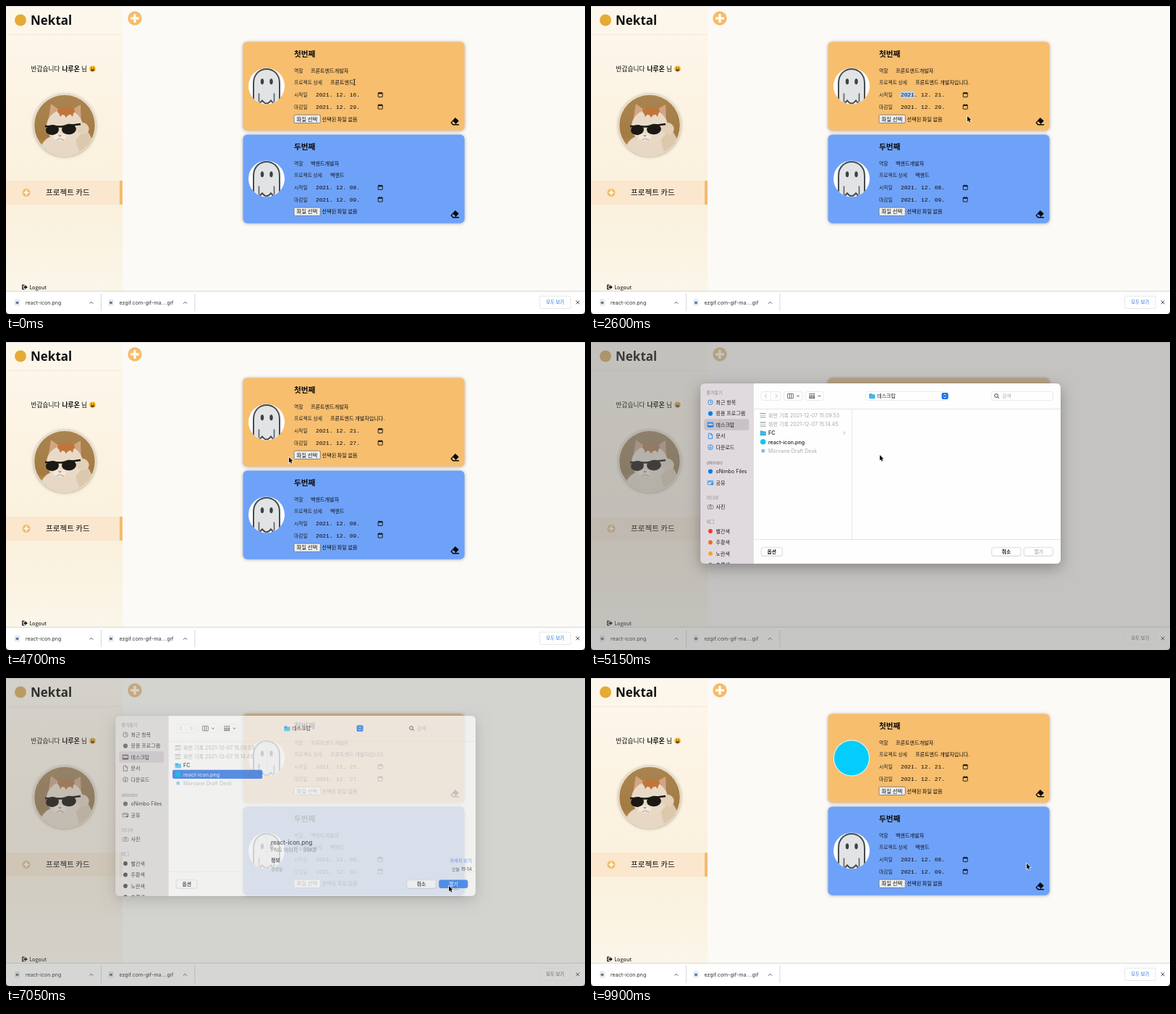
These frames come from a looping animation (800 px wide and 425 px high, 9.95 s). An HTML page with a canvas:

```html
<!DOCTYPE html>
<html lang="ko">
<head>
<meta charset="utf-8">
<title>프로젝트 카드</title>
<style>
html, body { margin: 0; width: 100%; height: 100%; overflow: hidden; }
canvas { display: block; width: 800px; height: 425px; }
</style>
</head>
<body>
<canvas id="stage"></canvas>
<script>
const LOOP = 9950, STEP = 50, W = 800, H = 425;
const KR = '"Noto Sans CJK KR", "Noto Sans CJK", sans-serif';
const UI = 'Inter, "Noto Sans CJK KR", "Noto Sans CJK", sans-serif';
const BRAND = '"Noto Sans", sans-serif';
const MONO = '"Liberation Mono", monospace';
const canvas = document.getElementById('stage');
const c = canvas.getContext('2d');
const ratio = window.devicePixelRatio || 1;
canvas.width = W * ratio;
canvas.height = H * ratio;

const ORANGE = '#f7be6e', BLUE = '#6ea2f8', INK = '#0c0c0c', ACCENT = '#0a7fe8';
const clamp = v => Math.max(0, Math.min(1, v));
const ramp = (t, a, b) => clamp((t - a) / (b - a));
const ease = u => u * u * (3 - 2 * u);

function text(s, x, y, size, color = INK, weight = 400, font = KR, align = 'left') {
  c.font = `${weight} ${size}px ${font}`;
  c.textAlign = align;
  c.fillStyle = color;
  c.fillText(s, x, y);
}
function rect(x, y, w, h, color) {
  c.fillStyle = color;
  c.fillRect(x, y, w, h);
}
function box(x, y, w, h, r, fill, stroke, line = 0.7) {
  c.beginPath();
  c.roundRect(x, y, w, h, r);
  if (fill) { c.fillStyle = fill; c.fill(); }
  if (stroke) { c.strokeStyle = stroke; c.lineWidth = line; c.stroke(); }
}
function oval(x, y, rx, ry, color, turn = 0) {
  c.beginPath();
  c.ellipse(x, y, rx, ry, turn, 0, 7);
  c.fillStyle = color;
  c.fill();
}
const dot = (x, y, r, color) => oval(x, y, r, r, color);
function ring(x, y, r, color, line = 0.8) {
  c.beginPath();
  c.arc(x, y, r, 0, 7);
  c.strokeStyle = color;
  c.lineWidth = line;
  c.stroke();
}
// Points are given as a flat list x, y, x, y …
function path(points) {
  c.beginPath();
  for (let i = 0; i < points.length; i += 2) c.lineTo(points[i], points[i + 1]);
}
function poly(points, color) {
  path(points);
  c.fillStyle = color;
  c.fill();
}
function lines(points, color, width = 0.8) {
  path(points);
  c.strokeStyle = color;
  c.lineWidth = width;
  c.stroke();
}
function shadow(color, blur, dy = 0) {
  c.shadowColor = color;
  c.shadowBlur = blur * ratio;
  c.shadowOffsetY = dy * ratio;
}
const noShadow = () => shadow('transparent', 0);

function plus(x, y, r) {
  dot(x, y, r, '#f6bb68');
  const a = r * 0.62, b = r * 0.17;
  rect(x - a, y - b, 2 * a, 2 * b, '#fffaf0');
  rect(x - b, y - a, 2 * b, 2 * a, '#fffaf0');
}

function catPhoto() {
  c.save();
  shadow('rgba(0,0,0,.35)', 4, 0.5);
  dot(81, 164.5, 43, '#f4e6cb');
  noShadow();
  c.beginPath();
  c.arc(81, 164.5, 41.8, 0, 7);
  c.clip();
  const wall = c.createLinearGradient(0, 122, 0, 207);
  wall.addColorStop(0, '#aa8551');
  wall.addColorStop(0.7, '#a37b43');
  wall.addColorStop(1, '#d8a24d');
  c.fillStyle = wall;
  c.fillRect(38, 121, 86, 87);
  oval(78, 201, 31, 25, '#e6d8c4');
  oval(109, 190, 11, 22, '#dcc8ad', -0.25);
  poly([58, 160, 62, 135, 76, 145], '#d3a582');
  poly([88, 145, 103, 136, 104, 161], '#d3a582');
  oval(81, 166, 25, 23, '#e9dac7');
  oval(83, 145, 12, 5.5, '#c1753d');
  poly([72, 145, 75, 153, 79, 148, 83, 154, 88, 148, 92, 153, 94, 145], '#c1753d');
  oval(106, 169, 9, 8, '#e3d0b8', 0.5);
  oval(64, 171, 9, 7, '#1b1815', -0.1);
  oval(87, 170, 10, 7.3, '#1b1815', -0.1);
  lines([54, 166, 76, 166.5, 103, 163], '#1b1815', 2.6);
  oval(74, 181, 9, 5, '#f1e7da');
  poly([72, 178, 77, 178, 74.5, 181], '#c28b78');
  lines([70, 185, 74.5, 183, 80, 185], '#a08874', 0.8);
  c.restore();
}

function smiley(x, y) {
  dot(x, y, 4.4, '#f8bd31');
  oval(x - 1.5, y - 1.3, 0.6, 1, '#5e3a10');
  oval(x + 1.5, y - 1.3, 0.6, 1, '#5e3a10');
  c.beginPath();
  c.arc(x, y + 0.5, 2.7, 0, Math.PI);
  c.fillStyle = '#6b3515';
  c.fill();
}

function sidebar() {
  const g = c.createLinearGradient(0, 0, 0, 393);
  g.addColorStop(0, '#fdf7ec');
  g.addColorStop(0.35, '#fcf3e3');
  g.addColorStop(0.7, '#faf0dc');
  g.addColorStop(1, '#fbf6e9');
  c.fillStyle = g;
  c.fillRect(0, 0, 161, 393);
  rect(0, 39, 161, 0.8, '#f2e8d8');
  dot(20, 19.5, 8, '#e5ab35');
  text('Nektal', 34, 25.7, 17, '#111', 600, BRAND);
  text('반갑습니다', 34.5, 90, 8.7);
  text('나루온', 77.5, 90, 8.8, INK, 700);
  text('님', 104, 90, 8.7);
  smiley(119.6, 86.7);
  catPhoto();
  rect(0, 241, 161, 33, '#fae7ce');
  rect(157, 241, 4, 33, '#f4bc6b');
  plus(28, 257.5, 5.5);
  text('프로젝트 카드', 55, 261.3, 10.6);
  lines([25.5, 385.2, 22.7, 385.2, 22.7, 390.6, 25.5, 390.6], '#111', 1.2);
  rect(24.3, 386.9, 2.5, 2, '#111');
  poly([26.5, 384.9, 29.8, 387.9, 26.5, 390.9], '#111');
  text('Logout', 32.2, 390.7, 7.3, '#111', 500);
}

function ghost(x, y) {
  dot(x, y, 25, '#fff');
  c.save();
  c.beginPath();
  c.arc(x, y, 25, 0, 7);
  c.clip();
  c.beginPath();
  c.moveTo(x - 18, y + 21);
  c.lineTo(x - 18, y - 4);
  c.bezierCurveTo(x - 18, y - 30, x + 18, y - 30, x + 18, y - 4);
  c.lineTo(x + 18, y + 21);
  for (const k of [12, 0, -12]) c.quadraticCurveTo(x + k, y + 28, x + k - 6, y + 20);
  c.closePath();
  c.fillStyle = '#e1e3e5';
  c.fill();
  c.strokeStyle = '#464b50';
  c.lineWidth = 2;
  c.stroke();
  lines([x - 10.5, y + 10, x - 10.5, y + 22], '#5a5f64', 1.6);
  lines([x + 10.5, y + 10, x + 10.5, y + 22], '#5a5f64', 1.6);
  c.restore();
  oval(x - 6, y - 6.2, 2.2, 4, '#3c4146');
  oval(x + 6.5, y - 6.2, 2.2, 4, '#3c4146');
}

function calendarIcon(x, y) {
  box(x, y, 6, 5.8, 0.5, null, '#111', 0.9);
  rect(x, y, 6, 1.5, '#111');
  rect(x + 1, y - 1, 0.9, 1.2, '#111');
  rect(x + 4.1, y - 1, 0.9, 1.2, '#111');
}

function eraser(x, y, paper) {
  poly([x + 6.4, y, x + 11.4, y + 4.4, x + 7, y + 9, x + 11.6, y + 9, x + 11.6, y + 10.4,
    x + 3, y + 10.4, x, y + 7], '#080808');
  poly([x + 3.4, y + 4.9, x + 6.9, y + 8.1, x + 5.8, y + 9, x + 3.6, y + 9, x + 1.8, y + 7], paper);
}

function dateRow(label, day, y, focused) {
  text(label, 398, y, 6.8, '#222');
  if (focused) rect(427.7, y - 7.6, 19, 9.8, '#b3d4fc');
  text(`2021. 12. ${day}.`, 428, y, 7.8, INK, 400, MONO);
  calendarIcon(514.2, y - 5.3);
}

function card(y, d) {
  c.save();
  shadow('rgba(0,0,0,.32)', 4, 0.6);
  box(327.5, y, 306, 122.3, 6, d.color);
  c.restore();
  if (d.uploaded) {
    dot(360, y + 61, 25, '#e9fbff');
    dot(360, y + 61, 24, '#05cdfb');
  } else ghost(360, y + 61);
  text(d.title, 398, y + 20.8, 10.6, INK, 700);
  text('역할', 398, y + 42.7, 6.8, '#222');
  text(d.role, 421, y + 42.7, 7.1, INK, 500);
  text('프로젝트 상세', 398, y + 58.8, 6.8, '#222');
  text(d.detail, 448, y + 58.8, 7.1, INK, 500);
  if (d.caret) rect(448.4 + c.measureText(d.detail).width, y + 52, 0.6, 8, '#111');
  dateRow('시작일', d.start, y + 75.6, d.focus === 1);
  dateRow('마감일', d.end, y + 92.2, d.focus === 2);
  box(398, y + 100.7, 36.3, 11.3, 1.5, '#efefef', '#6d6d6d', 0.8);
  text('파일 선택', 401.5, y + 109, 7.4);
  text(d.file, 436.6, y + 109, 7.1, INK, 500);
  eraser(614.3, y + 104.6, d.color);
}

function pageIcon(x, y) {
  box(x - 2.6, y - 3.8, 5.4, 7.4, 0.4, '#fff', '#b8bdc4', 0.6);
  rect(x - 1.8, y - 1.6, 3.6, 3.4, '#54789f');
}
const caretUp = (x, y) => lines([x - 2.4, y + 1.2, x, y - 1.2, x + 2.4, y + 1.2], '#555', 1);

function downloads(inactive) {
  rect(0, 393, W, 32, '#fff');
  rect(0, 393, W, 0.8, '#cfcfcf');
  pageIcon(15.5, 409.3);
  text('react-icon.png', 27, 411.8, 7.1, '#333', 400, UI);
  caretUp(118, 409.5);
  rect(131, 397, 0.8, 24, '#cfcfcf');
  pageIcon(145, 409.3);
  text('ezgif.com-gif-ma....gif', 156.5, 411.8, 7.1, '#333', 400, UI);
  caretUp(247.5, 409.5);
  rect(260.5, 397, 0.8, 24, '#cfcfcf');
  box(737.5, 400.3, 42.5, 17.2, 2, '#fff', inactive ? '#f1f1f1' : '#dadce0');
  text('모두 보기', 758.7, 411.2, 6.4, inactive ? '#555' : '#1b6ce0', 500, KR, 'center');
  lines([787.5, 406.5, 792.3, 411.3], '#444', 1);
  lines([792.3, 406.5, 787.5, 411.3], '#444', 1);
}

function corners() {
  c.fillStyle = '#1c3567';
  for (const [x, s] of [[0, 1], [W, -1]]) {
    c.beginPath();
    c.moveTo(x, H);
    c.lineTo(x, H - 5);
    c.quadraticCurveTo(x, H, x + 5 * s, H);
    c.fill();
  }
}

const KEYS = '| | ㄱ| 개| 갭| 개바| 개발| 개발ㅈ| 개발자| 개발장| 개발자이| 개발자입| 개발자입ㄴ| 개발자입니| 개발자입닏| 개발자입니다| 개발자입니다.'.split('|');

function page(t) {
  rect(0, 0, W, H, '#fcfaf6');
  sidebar();
  rect(0, 0, W, 0.8, '#d9d8d6');
  plus(178, 17, 9.7);
  const key = Math.floor(ramp(t, 150, 1150) * (KEYS.length - 1));
  const none = '선택된 파일 없음';
  card(49.5, {
    color: ORANGE, title: '첫번째', role: '프론트엔드개발자', detail: '프론트엔드' + KEYS[key],
    caret: t < 1500, start: t < 2300 ? 16 : 21, end: t < 3800 ? 29 : 27,
    focus: t >= 1600 && t < 2900 ? 1 : t >= 2900 && t < 4150 ? 2 : 0,
    file: t >= 7150 && t < 9900 ? 'react-icon.png' : none, uploaded: t >= 9900
  });
  card(177.4, {
    color: BLUE, title: '두번째', role: '백엔드개발자', detail: '백엔드',
    start: '08', end: '09', focus: 0, file: none
  });
  downloads(t >= 5050 && t < 7150);
}

// A window behind a dialog turns paler and greyer.
function dimPage(amount) {
  c.save();
  c.globalCompositeOperation = 'saturation';
  rect(0, 0, W, H, `rgba(128,128,128,${0.4 * amount})`);
  c.restore();
  rect(0, 0, W, H, `rgba(118,117,115,${0.41 * amount})`);
}

function folder(x, y) {
  box(x - 4, y - 3.2, 4, 3, 0.6, '#2ba0dc');
  box(x - 4, y - 2.3, 8.2, 6, 0.7, '#41b5ec');
}

// Small outline icons of the file dialog's sidebar.
const ICONS = {
  clock(x, y, k) { ring(x, y, 3.3, k); lines([x, y - 2, x, y, x + 1.6, y + 0.6], k); },
  round(x, y, k) { dot(x, y, 3.1, k); },
  desk(x, y, k) { box(x - 3.8, y - 3, 7.6, 6, 0.6, null, k, 0.9); rect(x - 3.8, y + 1, 7.6, 2, k); rect(x - 3.8, y - 3, 7.6, 1.2, k); },
  doc(x, y, k) { lines([x + 0.6, y - 3.6, x - 2.6, y - 3.6, x - 2.6, y + 3.6, x + 2.6, y + 3.6, x + 2.6, y - 1.5, x + 0.6, y - 3.6, x + 0.6, y - 1.5, x + 2.6, y - 1.5], k); },
  down(x, y, k) { ring(x, y, 3.4, k); lines([x, y - 1.9, x, y + 1.7], k); lines([x - 1.5, y + 0.3, x, y + 1.8, x + 1.5, y + 0.3], k); },
  share(x, y, k) { box(x - 3.8, y - 2.4, 7.6, 5.2, 0.7, null, k); lines([x - 3.8, y - 0.9, x + 3.8, y - 0.9], k); dot(x + 2.3, y + 1.8, 1.4, k); },
  camera(x, y) { box(x - 3.9, y - 2.2, 7.8, 5.2, 0.8, null, '#777'); ring(x, y + 0.4, 1.5, '#777'); rect(x - 1.3, y - 3.2, 2.6, 1, '#777'); }
};

const PLACES = [
  ['즐겨찾기', 72.3], ['최근 항목', 85.8, 'clock'], ['응용 프로그램', 101.3, 'round'],
  ['데스크탑', 116.8, 'desk'], ['문서', 132.3, 'doc'], ['다운로드', 147.8, 'down'],
  ['oNimbo', 168.5], ['oNimbo Files', 181.2, 'round'], ['공유', 196.6, 'share'],
  ['미디어', 216.8], ['사진', 230, 'camera'], ['태그', 250.3],
  ['빨간색', 263.6, '#f5372e'], ['주황색', 279.1, '#e8701c'],
  ['노란색', 294.6, '#f7a51c'], ['초록색', 310.1, '#37b44a']
];

function places(inactive) {
  rect(151, 57, 73.5, 249, inactive ? '#dfdcdc' : '#e0dadf');
  box(156.3, 106.3, 62, 15.4, 3, '#c8c2c7');
  for (const [name, y, icon] of PLACES) {
    if (!icon) text(name, 159.5, y, 6, '#8c878b', 500, UI);
    else {
      text(name, 172.5, y, 7, '#1f1f1f', 400, UI);
      if (icon[0] === '#') dot(165, y - 2.6, 2.9, inactive ? '#333' : icon);
      else ICONS[icon](165, y - 2.6, inactive ? '#555' : ACCENT);
    }
  }
}

function button(label, x, w, blue, color = '#1c1c1c') {
  c.save();
  shadow('rgba(0,0,0,.2)', 1, 0.4);
  box(x, 283.4, w, 11.5, 2.8, blue ? '#2777ef' : '#fff', blue ? null : '#dedede', 0.5);
  c.restore();
  text(label, x + w / 2, 291.7, 6.8, blue ? '#fff' : color, 600, UI, 'center');
}

function toolbar() {
  const edge = '#e2e2e2', gray = '#b5b5b5', dark = '#444';
  box(235, 68.5, 27, 12, 3, null, edge);
  rect(248.4, 68.5, 0.6, 12, edge);
  lines([243, 71.8, 240.3, 74.5, 243, 77.2], gray, 1);
  lines([254.5, 71.8, 257.2, 74.5, 254.5, 77.2], gray, 1);
  box(266.5, 68.5, 25.5, 12, 3, null, edge);
  box(271.5, 71.3, 8, 6.5, 0.7, null, dark);
  for (const x of [274.2, 276.9]) lines([x, 71.3, x, 77.8], dark);
  box(296, 68.5, 25.5, 12, 3, null, edge);
  for (let i = 0; i < 9; i++) rect(301.5 + (i % 3) * 2.8, 71 + Math.floor(i / 3) * 2.6, 2, i < 3 ? 1.2 : 1.9, dark);
  for (const x of [286, 315.5]) lines([x - 1.7, 73.7, x, 75.4, x + 1.7, 73.7], dark, 1);
  box(379.5, 68.3, 115, 12.2, 3, null, edge);
  folder(388.3, 74.5);
  text('데스크탑', 395.2, 77, 7, '#222', 500, UI);
  box(484.5, 70, 9, 9, 2.2, '#1671ea');
  lines([487.3, 73.6, 489, 71.9, 490.7, 73.6], '#fff', 1);
  lines([487.3, 75.5, 489, 77.2, 490.7, 75.5], '#fff', 1);
  box(553, 68.3, 85.5, 12.2, 3, null, edge);
  ring(560, 74, 2.4, dark, 1);
  lines([561.7, 75.7, 563.8, 77.8], dark, 1);
  text('검색', 568, 77, 6.8, '#aaa', 400, UI);
}

function fileList(selected) {
  const names = ['화면 기록 2021-12-07 15.09.53', '화면 기록 2021-12-07 15.14.45', 'FC', 'react-icon.png', 'Morvane Draft Desk'];
  if (selected) box(230, 131.7, 124.3, 12.2, 2.5, '#1c66dc');
  names.forEach((name, i) => {
    const y = 103.6 + i * 12.3, live = i === 2 || i === 3;
    const color = i === 3 && selected ? '#fff' : live ? '#1b1b1b' : '#aaa';
    if (i < 2) {
      rect(233.5, y - 5.5, 8, 1.2, '#999');
      rect(233.5, y - 2.6, 8, 1.1, '#c8c8c8');
      rect(233.5, y - 0.2, 8, 1.1, '#aaa');
    } else if (i === 2) folder(237.7, y - 2.6);
    else if (i === 3) dot(237.7, y - 2.7, 3.8, '#11c7ee');
    else rect(235.5, y - 4.8, 4.4, 4.4, '#7ebbe6');
    text(name, 245, y, 7.1, color, live ? 500 : 400, UI);
  });
  lines([348.8, 123.6, 350.8, 125.6, 348.8, 127.6], '#999');
}

function preview() {
  text('react-icon.png', 366, 234.6, 8.1, '#222', 500, UI);
  text('PNG 이미지 - 99KB', 366, 245.4, 7.2, '#777', 400, UI);
  text('정보', 366, 258.8, 6.8, '#222', 700, UI);
  text('자세히 보기', 643.5, 258.8, 6.2, '#2f73dd', 400, UI, 'right');
  text('생성일', 366, 271, 5.9, '#888', 400, UI);
  text('오늘 15:14', 643.5, 271, 6.2, '#333', 500, UI, 'right');
}

function dialog(t) {
  const shown = ramp(t, 5050, 5130), gone = ramp(t, 7010, 7150);
  const alpha = shown * (1 - gone);
  if (!alpha) return;
  const selected = t >= 6000;
  c.save();
  c.globalAlpha = alpha;
  c.translate(0, -5 * (1 - shown) - 5 * Math.min(1, gone * 3.5));
  c.save();
  // Shadow stays outside the sheet so that a fading sheet shows the cards beneath.
  c.beginPath();
  c.rect(0, -20, W, H + 40);
  c.roundRect(151, 57, 498, 249, 6);
  c.clip('evenodd');
  shadow(`rgba(0,0,0,${0.3 * alpha})`, 20, 6);
  box(151, 57, 498, 249, 6, '#fff');
  c.restore();
  c.save();
  c.beginPath();
  c.roundRect(151, 57, 498, 249, 6);
  c.clip();
  rect(224.5, 57, 425, 249, '#fefefe');
  places(t >= 7000);
  toolbar();
  rect(224.5, 92, 424.5, 0.8, '#dedede');
  rect(360, 92, 0.8, 180, '#e2e2e2');
  rect(224.5, 272, 424.5, 0.8, '#dedede');
  fileList(selected);
  if (selected) preview();
  button('옵션', 235.2, 29);
  button('취소', 553.7, 40.3);
  button('열기', 598.2, 40, selected, '#b5b5b5');
  c.restore();
  box(151, 57, 498, 249, 6, null, 'rgba(0,0,0,.12)', 0.6);
  c.restore();
}

// Pointer stops: time, x, y of the tip.
const STOPS = [
  [1150, 481, 104], [1500, 517, 121], [1700, 517, 121], [2150, 455, 205], [2350, 455, 205],
  [2600, 520, 152], [2850, 517, 138], [3050, 517, 138], [3600, 470, 225], [3850, 470, 225],
  [4700, 391, 159], [4850, 399, 156], [5300, 399, 156], [5800, 272, 137], [6050, 272, 137],
  [6800, 612, 287], [7250, 612, 287], [8000, 602, 256]
];

function pointer(t) {
  if (t < 1200) {
    lines([479.8, 101, 481.3, 101.7, 482.8, 101], '#222');
    lines([481.3, 101.5, 481.3, 108.5], '#222');
    lines([479.8, 109, 481.3, 108.3, 482.8, 109], '#222');
    return;
  }
  const i = STOPS.findIndex(s => s[0] > t);
  const b = STOPS[i < 0 ? STOPS.length - 1 : i], a = i < 0 ? b : STOPS[i - 1];
  const u = i < 0 ? 0 : ease(ramp(t, a[0], b[0]));
  c.save();
  c.translate(a[1] + (b[1] - a[1]) * u, a[2] + (b[2] - a[2]) * u);
  const tip = [0, 0, 0, 7.4, 1.7, 5.9, 2.9, 8.7, 4.2, 8.1, 3, 5.4, 5.3, 5.3];
  path(tip);
  c.closePath();
  c.strokeStyle = '#fff';
  c.lineWidth = 1.3;
  c.stroke();
  poly(tip, '#080808');
  c.restore();
}

function draw(t) {
  c.setTransform(ratio, 0, 0, ratio, 0, 0);
  page(t);
  const dim = ramp(t, 5000, 5150) * (1 - ramp(t, 7000, 7180));
  if (dim) dimPage(dim);
  corners();
  dialog(t);
  pointer(t);
}

const began = performance.now();
function tick() {
  const t = (performance.now() - began) % LOOP;
  draw(Math.floor(t / STEP) * STEP);
  requestAnimationFrame(tick);
}
tick();
</script>
</body>
</html>
```
